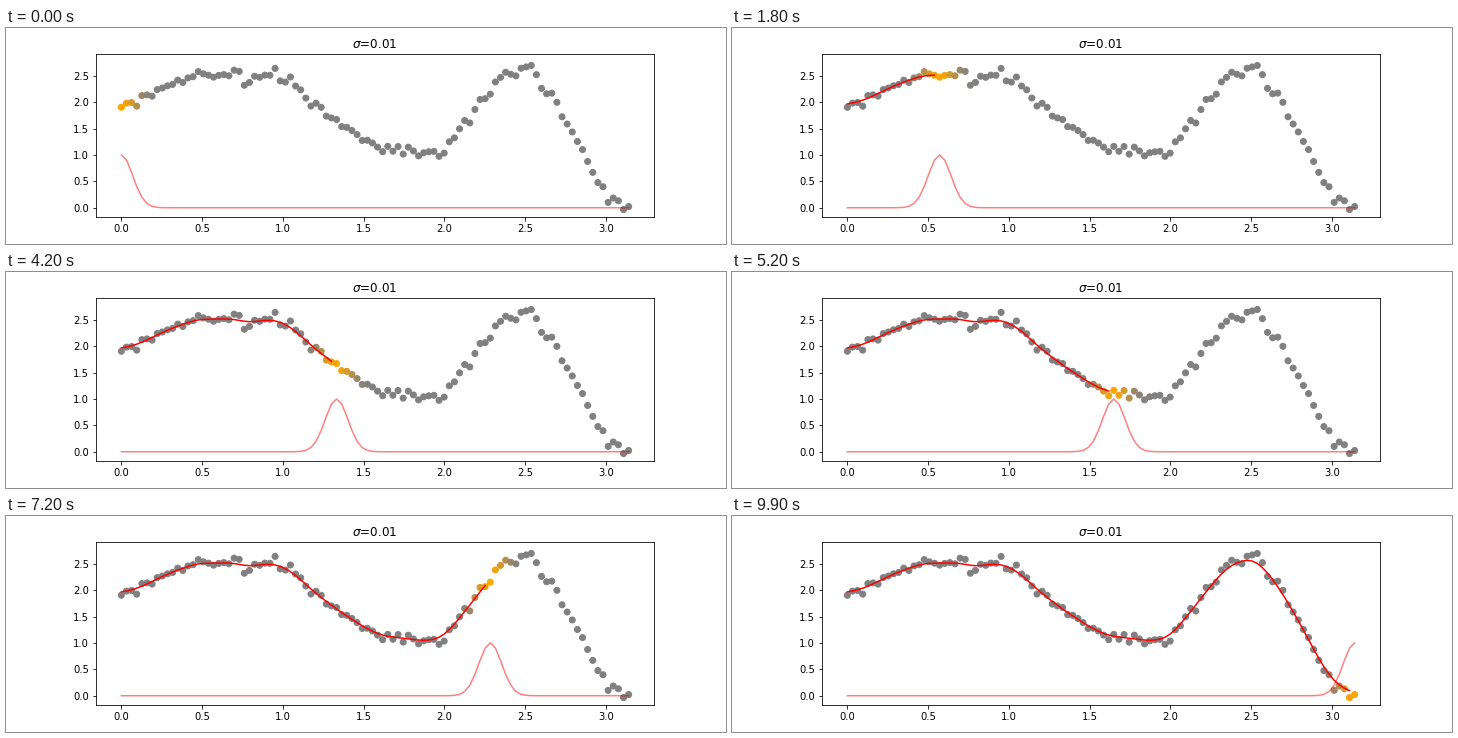
Animation of 720 by 216 pixels, one loop 10000 ms. Source, as a matplotlib script:

```python
import numpy as np
import matplotlib.pyplot as plt
from matplotlib.animation import FuncAnimation
from matplotlib.colors import to_rgb

SIGMA = 0.01
N = 100

# Noisy samples around a trend through a few turning points
knots = np.array([
    (0, 1.88), (0.46, 2.54), (0.98, 2.49), (1.57, 1.13), (1.98, 1.04),
    (2.35, 2.46), (2.52, 2.72), (2.68, 2.05), (2.98, 0.33), (np.pi, 0),
])
rng = np.random.default_rng(1)
x = np.linspace(0, np.pi, N)
y = np.interp(x, *knots.T) + rng.normal(0, 0.07, N)

# Gaussian kernel weights, one row per query point
weights = np.exp(-(x[:, None] - x) ** 2 / SIGMA)
smooth = weights @ y / weights.sum(axis=1)

GRAY, ORANGE = (np.array(to_rgb(c)) for c in ("gray", "orange"))

fig, ax = plt.subplots(figsize=(10, 3), dpi=72)
fig.subplots_adjust(left=0.125, right=0.9, bottom=0.125, top=0.88)
ax.set_xlim(-0.05 * np.pi, 1.05 * np.pi)
ax.set_ylim(-0.1755, 2.9155)
ax.set_title(rf"$\sigma$={SIGMA}")

dots = ax.scatter(x, y, color="gray")
kernel, = ax.plot([], [], color="red", alpha=0.5)
fit, = ax.plot([], [], color="red")


def update(i):
    w = weights[i]
    dots.set_color(GRAY + w[:, None] * (ORANGE - GRAY))
    kernel.set_data(x, w)
    fit.set_data(x[:i], smooth[:i])
    return dots, kernel, fit


anim = FuncAnimation(fig, update, frames=N, interval=100, repeat=True,
                     repeat_delay=0, init_func=lambda: update(0))
plt.show()
```
